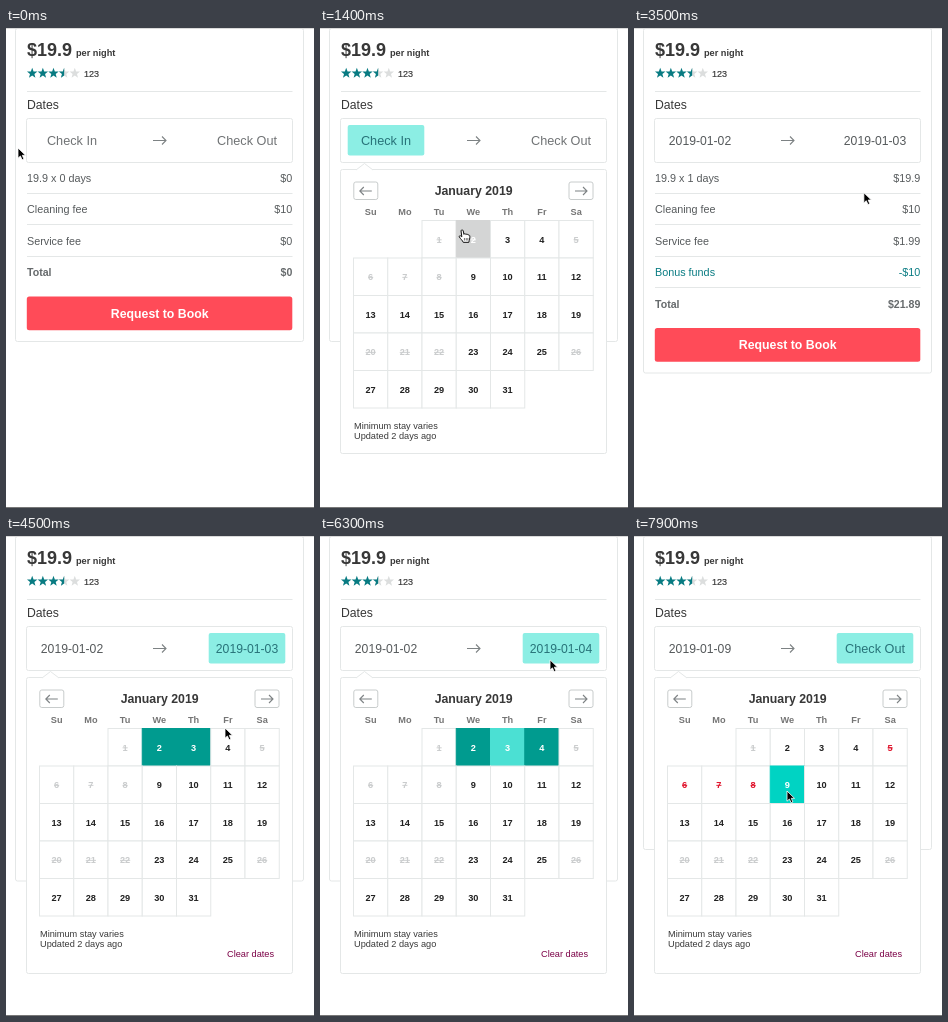
Write an HTML page that moves like this. It is 308 by 480 pixels and loops after 8 s.

```html
<!DOCTYPE html>
<html lang="en">
<head>
<meta charset="utf-8">
<title>Booking date picker</title>
<style>
  html, body { margin: 0; width: 100%; height: 100%; overflow: hidden; background: #fff; }
  svg { display: block; width: 308px; height: 480px; font-family: "Liberation Sans", Arial, sans-serif; }
</style>
</head>
<body>
<svg viewBox="0 0 308 480">
  <g id="scene"></g>
  <g id="arrow">
    <path d="M0 0V10.2L2.4 8L4.1 11.8L5.9 11L4.3 7.3H7.5Z" fill="#000" stroke="#fff" stroke-width=".8"/>
  </g>
  <g id="hand" fill="#fff" stroke="#111" stroke-width="1" stroke-linejoin="round">
    <path d="M-1 .8C-1-.4 1-.4 1.2.8L1.9 4.3C2.2 3.3 3.7 3.5 3.9 4.5C4.5 3.8 5.8 4.1 6 5C6.8 4.6 7.8 5.2 7.8 6.2C8 8.6 7.2 9.5 6.8 12.3H1.2C.6 10.5-1.5 9-2.7 6.9C-3.2 5.7-1.8 5.3-.9 6.2L-.2 6.8Z"/>
    <path d="M2.4 8V10.5M4.2 8V10.5M5.8 8V10.5" stroke-width=".6"/>
  </g>
</svg>
<script>
const LOOP = 8000;
const LINE = '#e4e7e7', GREY = '#565a5c', DARK = '#383838', TEAL = '#087b82';
const BLOCKED = [1, 5, 6, 7, 8, 20, 21, 22, 26];
const COL = 34.25, ROW = 37.5, LEFT = 33.5, TOP = 192.5;

// Pointer stops: time, x, y
const PATH = [
  [0, 12, 120], [500, 62, 113], [750, 66, 114], [1350, 142, 202], [1800, 143, 203],
  [2350, 185, 211], [2700, 185, 211], [3200, 196, 246], [3600, 236, 150], [3950, 240, 113],
  [4150, 240, 113], [4500, 219, 192], [4700, 220, 208], [4950, 219, 208], [5450, 153, 147],
  [5600, 153, 147], [6000, 236, 113], [6200, 236, 113], [6800, 157, 257], [7300, 156, 257],
  [7700, 153, 255], [8000, 153, 255]
];

// Each click changes part of the form
const CLICKS = [
  [600, { open: true, focus: 'in' }],
  [1600, { start: 2, focus: 'out' }],
  [2600, { end: 3, open: false }],
  [4100, { open: true }],
  [4900, { end: 4, open: false }],
  [6100, { open: true }],
  [7400, { start: 9, end: 0 }]
];

const $ = id => document.getElementById(id);

const text = (x, y, str, size, fill = GREY, extra = '') =>
  `<text x="${x}" y="${y}" font-size="${size}" fill="${fill}" ${extra}>${str}</text>`;
const rect = (x, y, w, h, fill, stroke = 'none', r = 0) =>
  `<rect x="${x}" y="${y}" width="${w}" height="${h}" rx="${r}" fill="${fill}" stroke="${stroke}"/>`;
const path = (d, stroke, fill = 'none', width = 1) =>
  `<path d="${d}" stroke="${stroke}" fill="${fill}" stroke-width="${width}"/>`;
const rule = y => path(`M21 ${y}H286.5`, LINE);
const BOLD = 'font-weight="700"', MID = 'text-anchor="middle"', END = 'text-anchor="end"';

function arrowIcon(x, y, half, dir, color) {
  const tip = x + dir * half;
  return path(`M${x - dir * half} ${y}H${tip}M${tip - dir * 4} ${y - 4}L${tip} ${y}L${tip - dir * 4} ${y + 4}`, color, 'none', 1.1);
}

function star(cx, cy, fill, points = 10) {
  const pts = [];
  for (let i = 0; i <= points; i++) {
    const r = i % 2 ? 2.3 : 5.5, a = -Math.PI / 2 - i * Math.PI / 5;
    pts.push((cx + r * Math.cos(a)).toFixed(2) + ',' + (cy + r * Math.sin(a)).toFixed(2));
  }
  return `<polygon points="${pts.join(' ')}" fill="${fill}"/>`;
}

function header() {
  let out = text(21, 28, '$19.9', 18, DARK, BOLD) + text(70, 28, 'per night', 9.2, DARK, BOLD);
  for (let i = 0; i < 5; i++) {
    const x = 26.2 + i * 10.65;
    out += star(x, 45.3, i < 3 ? TEAL : '#dcdede');
    if (i === 3) out += star(x, 45.3, TEAL, 5);
  }
  return out + text(78, 49, '123', 9, DARK, 'stroke="#383838" stroke-width=".2"')
    + rule(63.5) + text(21, 81, 'Dates', 12.2, DARK);
}

function dateBox(s) {
  const field = (name, x, day, hint) => {
    const on = s.open && s.focus === name;
    const label = day ? '2019-01-0' + day : hint;
    return (on ? rect(x - 38.3, 97, 76.6, 30.5, '#8ceee4', 'none', 2) : '')
      + text(x, 116.8, label, day ? 12.2 : 12.7, on ? '#287379' : day ? GREY : '#707375', MID);
  };
  return rect(20.5, 90.5, 266, 44, '#fff', LINE, 2)
    + field('in', 66, s.start, 'Check In') + field('out', 241, s.end, 'Check Out')
    + arrowIcon(153.5, 112.5, 6.5, 1, '#7d8284');
}

function bill(s) {
  const days = s.end ? s.end - s.start : 0;
  const cost = 19.9 * days, fee = cost / 10;
  const money = v => '$' + +v.toFixed(2);
  const rows = [
    [`19.9 x ${days} days`, money(cost)],
    ['Cleaning fee', '$10'],
    ['Service fee', money(fee)]
  ];
  if (days) rows.push(['Bonus funds', '-$10', TEAL]);
  rows.push(['Total', money(cost + fee), '#666a6c', BOLD]);
  let out = '';
  rows.forEach(([name, value, color, weight = ''], i) => {
    const y = 154 + i * 31.4, size = weight ? 10.6 : 10.8;
    out += text(21, y, name, size, color, weight) + text(286.3, y, value, size, color, END + weight.replace('font', ' font'));
    if (i < rows.length - 1) out += rule(Math.round(y + 11) + .5);
  });
  const top = days ? 300 : 268.5;
  return out + rect(20.8, top, 265.5, 33.7, '#ff4b58', 'none', 2.5)
    + text(153.7, top + 21, 'Request to Book', 12.3, '#fff', BOLD + ' ' + MID);
}

const slot = day => [(day + 1) % 7, Math.floor((day + 1) / 7)];

function dayCell(day, s, hover) {
  const [col, row] = slot(day);
  const x = LEFT + col * COL, y = TOP + row * ROW;
  const blocked = BLOCKED.includes(day), picking = day === s.start && !s.end;
  let fill = '#fff', color = '#222', strike = blocked, border = LINE;
  if (blocked) color = s.start === 9 && day > 4 && day < 9 ? '#e0142c' : '#cacccd';
  if (day === s.start || day === s.end) {
    fill = picking && day === hover ? '#00d3c3' : '#009b8f';
    color = '#fff';
    border = fill;
  } else if (day > s.start && day < s.end) {
    fill = border = '#4be0d3';
    color = '#fff';
  } else if (day === hover && !blocked) {
    fill = border = '#d4d5d5';
    color = '#fff';
    strike = true;
  }
  return rect(x, y, COL, ROW, fill, border)
    + text(x + COL / 2, y + 22, day, 9.2, color, `${BOLD} ${MID}${strike ? ' text-decoration="line-through"' : ''}`);
}

function calendar(s, hover) {
  let out = rect(20.5, 141.5, 266, s.start ? 296 : 284, '#fff', LINE, 2)
    + path('M36 142L44.5 135.5L53 142', LINE, '#fff');
  for (const [x, dir] of [[33.8, -1], [249, 1]])
    out += rect(x, 154, 24, 17.5, '#fff', '#c8cccc', 2) + arrowIcon(x + 12, 163, 6, dir, '#7d8284');
  out += text(153.6, 167, 'January 2019', 12.3, DARK, BOLD + ' ' + MID);
  ['Su', 'Mo', 'Tu', 'We', 'Th', 'Fr', 'Sa'].forEach((name, i) => {
    out += text(LEFT + (i + .5) * COL, 187, name, 9.2, '#757575', BOLD + ' ' + MID);
  });
  for (let day = 1; day <= 31; day++) out += dayCell(day, s, hover);
  out += text(34, 400.5, 'Minimum stay varies', 9.2, DARK) + text(34, 411, 'Updated 2 days ago', 9.2, DARK);
  if (s.start) out += text(268, 421, 'Clear dates', 9.2, '#7b0046', END);
  return out;
}

function pointer(t) {
  const i = PATH.findIndex(p => p[0] > t);
  const [t0, x0, y0] = PATH[i - 1], [t1, x1, y1] = PATH[i];
  const k = (t - t0) / (t1 - t0), e = k * k * (3 - 2 * k);
  return [x0 + (x1 - x0) * e, y0 + (y1 - y0) * e];
}

function dayAt(x, y) {
  const col = Math.floor((x - LEFT) / COL), row = Math.floor((y - TOP - 1) / ROW);
  if (col < 0 || col > 6 || row < 0) return 0;
  const day = row * 7 + col - 1;
  return day > 0 && day < 32 ? day : 0;
}

let shown = '';
function draw(now) {
  const t = now % LOOP;
  const s = { open: false, focus: 'in', start: 0, end: 0 };
  for (const [at, change] of CLICKS) if (t >= at) Object.assign(s, change);
  const [x, y] = pointer(t);
  const hover = s.open ? dayAt(x, y) : 0;

  const key = JSON.stringify([s, hover]);
  if (key !== shown) {
    shown = key;
    $('scene').innerHTML = rect(9.5, .5, 288, s.end ? 344.5 : 313, '#fff', LINE, 2)
      + path('M0 .5H308', '#dadada') + path('M0 479.5H308', '#777')
      + header() + dateBox(s) + bill(s) + (s.open ? calendar(s, hover) : '');
  }

  const pointing = hover === 9 && s.end || hover === 2 && !s.start;
  $('arrow').style.display = pointing ? 'none' : '';
  $('hand').style.display = pointing ? '' : 'none';
  for (const id of ['arrow', 'hand']) $(id).setAttribute('transform', `translate(${x} ${y})`);
}

const begin = performance.now();
function tick() {
  draw(performance.now() - begin);
  requestAnimationFrame(tick);
}
tick();
</script>
</body>
</html>
```
